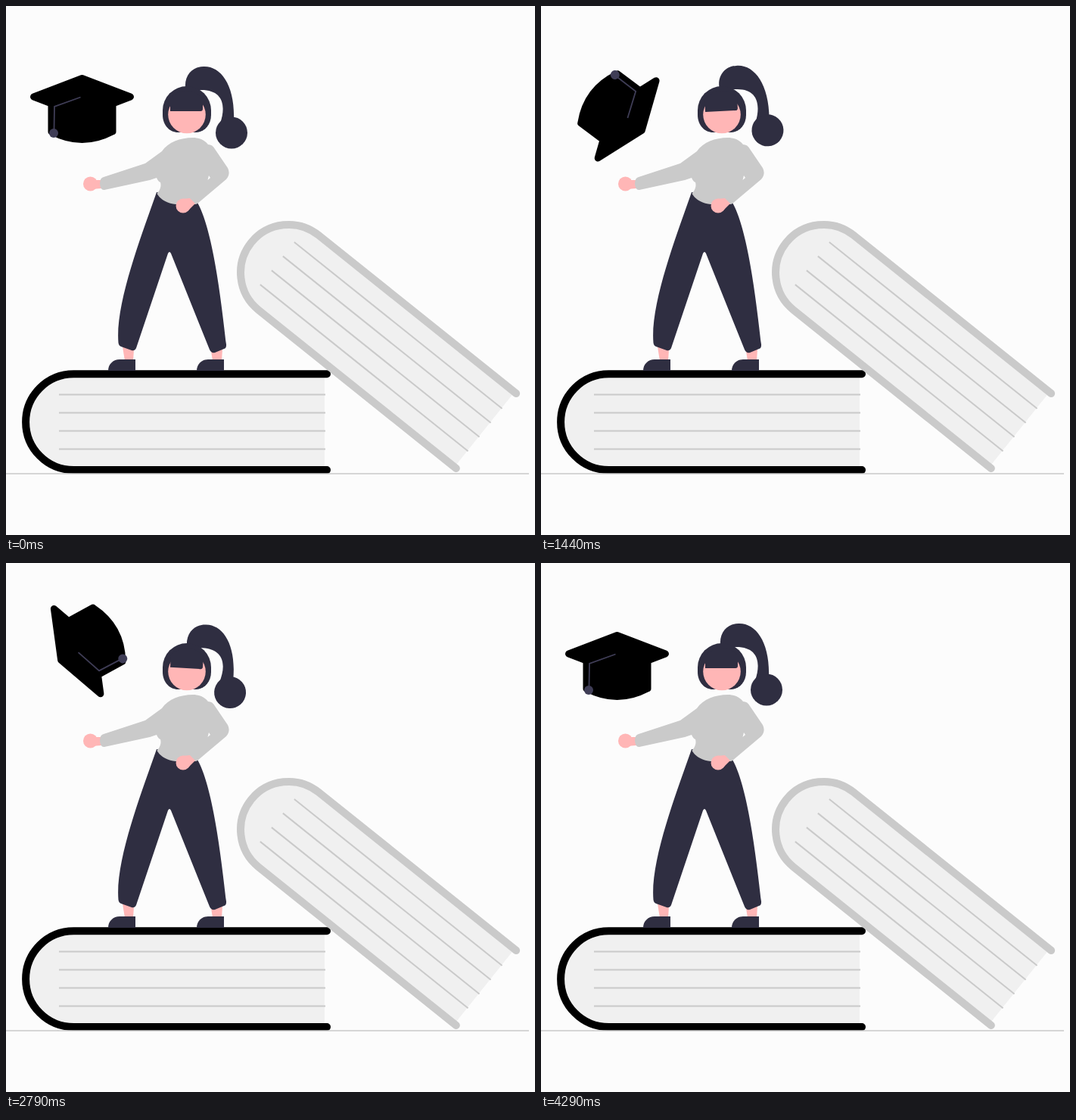
An HTML page for the animation above (4320 ms loop, 699 px wide and 699 px high).

```html
<!DOCTYPE html>
<html lang="en">
<head>
<meta charset="utf-8">
<title>Graduate tossing a cap</title>
<style>
  html, body { margin: 0; width: 100%; height: 100%; overflow: hidden; background: #fcfcfc; }
  svg { display: block; width: 100%; height: 100%; }
</style>
</head>
<body>
<svg viewBox="0 0 699 699">
  <defs>
    <g id="book">
      <path d="M421 486H89.5a63.4 63.4 0 0 0 0 127H421z" fill="#f0f0f0"/>
      <path d="M70 513.5H422M70 537.5H422M70 561.5H422M70 585.5H422" stroke="#cacaca" stroke-width="2"/>
      <path d="M424 486.3H89.5a63.4 63.4 0 0 0 0 126.8H424" fill="none" stroke="currentColor" stroke-width="10" stroke-linecap="round"/>
    </g>
    <path id="shoe" d="M0 15C0 6 7 0 15 0H36V15z" fill="#2f2e41"/>
  </defs>

  <use href="#book" color="#000"/>
  <use href="#book" color="#cacaca" transform="translate(634.5 561.5) rotate(38.7) translate(-424 -549.7)"/>
  <path d="M0 618H691" stroke="#cacaca" stroke-width="1.6"/>

  <!-- legs -->
  <path d="M154 450L169 454L168 469H157zM271 456L286 453L285 469H273z" fill="#ffb6b6"/>
  <use href="#shoe" x="135" y="467"/>
  <use href="#shoe" x="252" y="467"/>
  <path d="M199 246C180 301 144 393 148.500 445Q149 449 152 450L166 455Q170 456 172 452L214 327Q216 323 218 327L269 454Q271 459 276 458L288 453Q291.500 452 291 447C285 395 274 297 253 260z" fill="#2f2e41"/>

  <!-- arms and torso -->
  <g fill="#ffb6b6">
    <circle cx="111.500" cy="235" r="9.500"/>
    <path d="M113 230H126V241L113 242z"/>
  </g>
  <path d="M206 192C214 180 230 174 247 174C256 174 263 178 267 183Q273 183 276 189L293 214Q297 222 291 229L253 261Q250 263 247 261C232 264 209 264 199.500 248C205 241 205 237 204 233Q201 232 199 227L190 230L130 243Q125 244 124 235Q124 227 129 226L184 208z" fill="#cacaca"/>
  <path d="M266.500 230L268 224L270 227z" fill="#fcfcfc"/>
  <g fill="#ffb6b6">
    <circle cx="234" cy="264" r="9.500"/>
    <path d="M232 255L243 254L250 261L240 271z"/>
  </g>

  <!-- head -->
  <g class="hair" fill="#2f2e41">
    <path d="M237.500 112C234 91 247 80 261 80C284 79 303 105 301 152L283 155C291 132 287 111 258 111z"/>
    <circle cx="298" cy="167.500" r="21"/>
  </g>
  <path d="M207 138a32 32 0 0 1 64 0v6c0 14-10 23-20 23h-24c-10 0-20-9-20-23z" fill="#2f2e41"/>
  <circle cx="239" cy="143.500" r="24.800" fill="#ffb6b6"/>
  <path class="hair" d="M217 139V122Q239 102 260 122V136Q260 139 257 139z" fill="#2f2e41"/>

  <!-- cap, centred on its own origin -->
  <g id="cap">
    <path d="M-64 -16L0 -40.500L64 -16L0 8.500z" stroke="#000" stroke-width="9" stroke-linejoin="round"/>
    <path d="M-45 -8V30q0 3 3 4Q0 56 42 34q3-1 3-4V-8z"/>
    <path d="M-2 -15.500L-36.500 -3L-37 27" fill="none" stroke="#3f3d56" stroke-width="1.800"/>
    <circle cx="-37.500" cy="32" r="6" fill="#3f3d56"/>
  </g>
</svg>
<script>
  const LOOP = 4320, STEP = 30;
  const LOW = 0.232, HIGH = 0.723; // where the cap turns round, as parts of the loop
  const { PI, sin, max, floor } = Math;
  const cap = document.getElementById('cap');
  const hair = document.querySelectorAll('.hair');

  const mix = (a, b, k) => a + (b - a) * k;

  // Straight runs: rest, low point, high point, rest.
  function swing(p, rest, low, high) {
    if (p < LOW) return mix(rest, low, p / LOW);
    if (p < HIGH) return mix(low, high, (p - LOW) / (HIGH - LOW));
    return mix(high, rest, (p - HIGH) / (1 - HIGH));
  }

  const start = performance.now();
  function draw() {
    const t = floor((performance.now() - start) % LOOP / STEP) * STEP;
    const p = max(0, t - STEP) / (LOOP - 2 * STEP);
    const x = 100.5 + 5.4 * sin(PI * p) ** 2 - 4.2 * sin(2 * PI * p);
    const y = swing(p, 136, 150, 101.5);
    const turn = 360 * p + 9 * sin(PI * p);
    cap.setAttribute('transform', `translate(${x} ${y}) rotate(${turn})`);
    hair.forEach(h => h.setAttribute('transform', `rotate(${swing(p, 0, -5, 5)} 238 138)`));
    requestAnimationFrame(draw);
  }
  draw();
</script>
</body>
</html>
```
